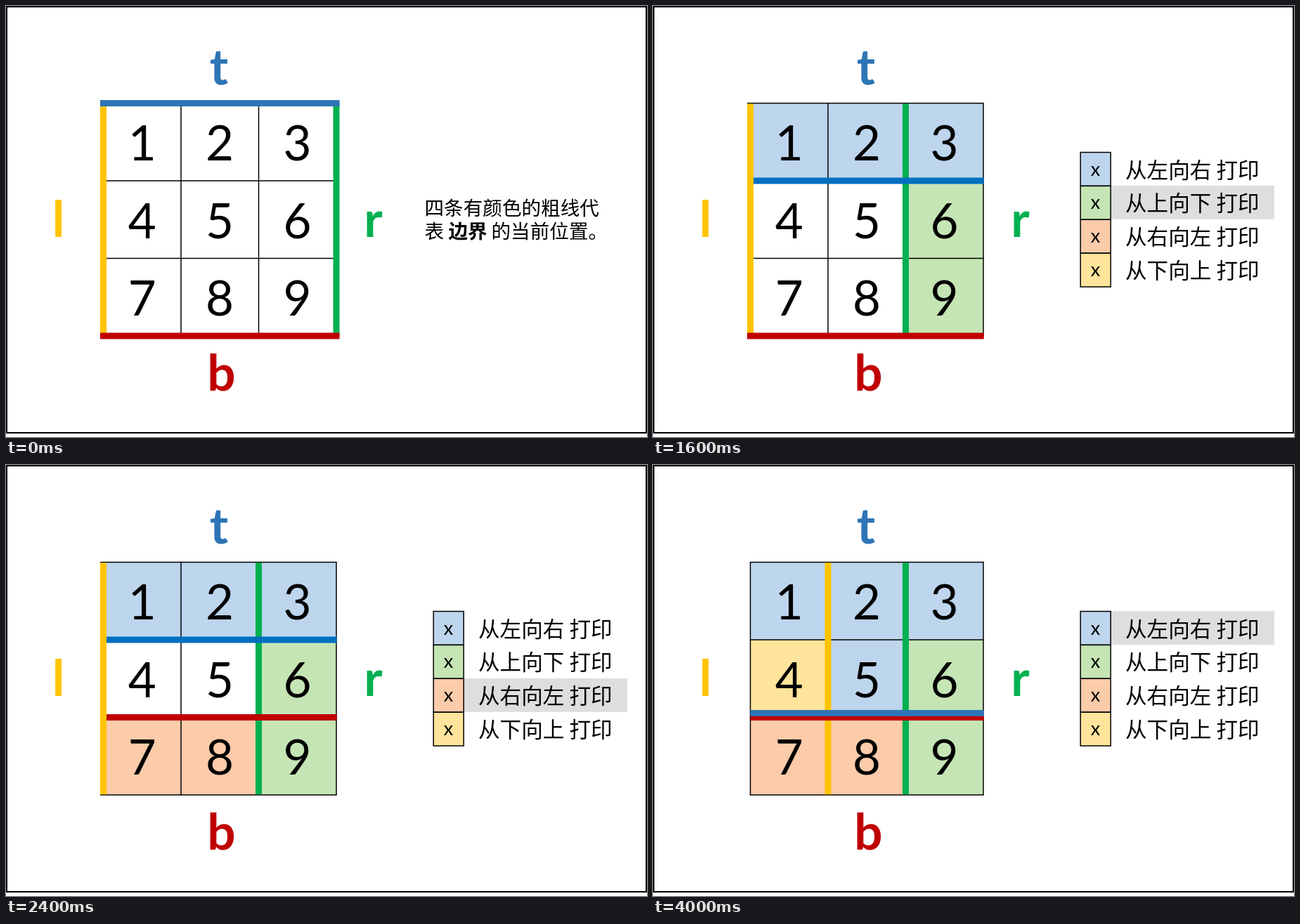
An HTML page for the animation above (4.8 s loop, 912 by 614 pixels).

```html
<!DOCTYPE html>
<html lang="zh-CN">
<head>
<meta charset="utf-8">
<style>
html, body { margin: 0; width: 100%; height: 100%; overflow: hidden; background: #fff; }
svg { display: block; }
.latin { font-family: Lato, "Open Sans", sans-serif; text-anchor: middle; }
.han { font-family: "Noto Sans CJK SC", "Noto Sans CJK", "Noto Sans", sans-serif; font-weight: 300; }
</style>
</head>
<body>
<svg id="stage" width="912" height="614" viewBox="0 0 912 614"></svg>
<script>
const stage = document.getElementById('stage');
const STEP = 800, STEPS = 6;
const EDGE = [138.5, 249, 359.5, 470];
const HALF = 4.5;
const TINT = { t: '#bdd5ed', r: '#c5e5b5', b: '#fbcbaa', l: '#ffe59b' };
const BLUE = '#2e75b6', VIVID = '#0070c0', GREEN = '#00b050', RED = '#c00000', GOLD = '#ffc400';

function add(parent, tag, attrs, text) {
  const el = document.createElementNS('http://www.w3.org/2000/svg', tag);
  for (const k in attrs) el.setAttribute(k, attrs[k]);
  if (text) el.textContent = text;
  parent.appendChild(el);
  return el;
}
const group = () => add(stage, 'g', {});
const box = (g, x1, y1, x2, y2, fill) =>
  add(g, 'rect', { x: x1, y: y1, width: x2 - x1, height: y2 - y1, fill });
const line = (g, x1, y1, x2, y2) =>
  add(g, 'line', { x1, y1, x2, y2, stroke: '#000', 'stroke-width': 1.5 });
const latin = (g, s, x, y, size, fill = '#000', weight = 400) =>
  add(g, 'text', { class: 'latin', x, y, fill, 'font-size': size, 'font-weight': weight }, s);
const han = (g, s, x, y, size, weight = 300) =>
  add(g, 'text', { class: 'han', x, y, 'font-size': size, style: 'font-weight:' + weight }, s);
function place(el, x1, y1, x2, y2) {
  el.setAttribute('x', x1);
  el.setAttribute('y', y1);
  el.setAttribute('width', x2 - x1);
  el.setAttribute('height', y2 - y1);
}
const show = (el, on) => el.setAttribute('visibility', on ? 'visible' : 'hidden');

add(stage, 'rect', { x: 1, y: 1, width: 910, height: 607, fill: '#fff', stroke: '#000', 'stroke-width': 2 });

// Cells: the side that claims each one and the step when it is filled
const owners = 'tttltrbbr';
const fillStep = { t: 1, r: 2, b: 3, l: 4 };
const cells = [...owners].map((side, i) => {
  const c = i % 3, r = Math.floor(i / 3);
  const el = box(stage, EDGE[c], EDGE[r], EDGE[c + 1], EDGE[r + 1], TINT[side]);
  return { el, from: i === 4 ? 5 : fillStep[side] };
});

const [A, B, C, D] = EDGE;
const grid = group();
const rows = EDGE.map(y => line(grid, A - .75, y, D + .75, y));
EDGE.forEach(x => line(grid, x, A, x, D));

const bars = group();
const left = box(bars, 0, 0, 0, 0, GOLD);
const right = box(bars, 0, 0, 0, 0, GREEN);
const bottom = box(bars, 0, 0, 0, 0, RED);
const top_ = box(bars, 0, 0, 0, 0, BLUE);

for (let i = 0; i < 9; i++)
  latin(stage, i + 1, 193.8 + 110.3 * (i % 3), 220 + 110.5 * Math.floor(i / 3), 69);

latin(stage, 't', 303, 112, 71, BLUE, 700);
latin(stage, 'l', 74.5, 329, 71, GOLD, 700);
latin(stage, 'r', 522.5, 329, 71, GREEN, 700);
latin(stage, 'b', 306.5, 548, 71, RED, 700);

const note = group();
han(note, '四条有颜色的粗线代', 595.5, 298, 27.6);
han(note, '表', 595.5, 331, 27.6);
han(note, '边界', 629.5, 331, 27.6, 700);
han(note, '的当前位置。', 690.5, 331, 27.6);

const legend = group();
const mark = box(legend, 652, 208, 884, 256, '#dededd');
['左向右', '上向下', '右向左', '下向上'].forEach((s, i) => {
  const y = 208.5 + 47.9 * i;
  add(legend, 'rect', { x: 608.2, y, width: 43, height: 47.9, fill: TINT['trbl'[i]], stroke: '#000', 'stroke-width': 1.5 });
  latin(legend, 'x', 629.5, y + 33, 27);
  han(legend, '从' + s, 672, y + 36, 30.6);
  han(legend, '打印', 801.5, y + 36, 30.6);
});

function draw(ms) {
  const n = Math.floor(ms / STEP) % STEPS;
  cells.forEach(c => show(c.el, n >= c.from));
  show(note, n === 0);
  show(legend, n > 0);
  const row = (n + 3) % 4;
  mark.setAttribute('y', 208 + 47.9 * row);

  const x1 = n < 4 ? A - HALF : A - .75;
  const x2 = n < 2 ? D + HALF : D + .75;
  for (const r of [rows[0], rows[3]]) {
    r.setAttribute('x1', x1);
    r.setAttribute('x2', x2);
  }

  const lx = n < 4 ? A : B, rx = n < 2 ? D : C;
  const ty = n < 1 ? A : n < 5 ? B : C - 6, by = n < 3 ? D : C;
  const inner = n < 4 ? A + HALF : A;
  place(left, lx - HALF, A + .7, lx + HALF, D - .7);
  place(right, rx - HALF, A + .7, rx + HALF, D - .7);
  place(bottom, n < 3 ? x1 : inner, by - HALF, x2, by + HALF);
  place(top_, n < 1 ? x1 : inner, ty - HALF, n === 1 ? D - HALF : x2, ty + HALF);
  top_.setAttribute('fill', n % 5 ? VIVID : BLUE);
}

function tick() {
  draw(performance.now());
  requestAnimationFrame(tick);
}
draw(0);
tick();
</script>
</body>
</html>
```
